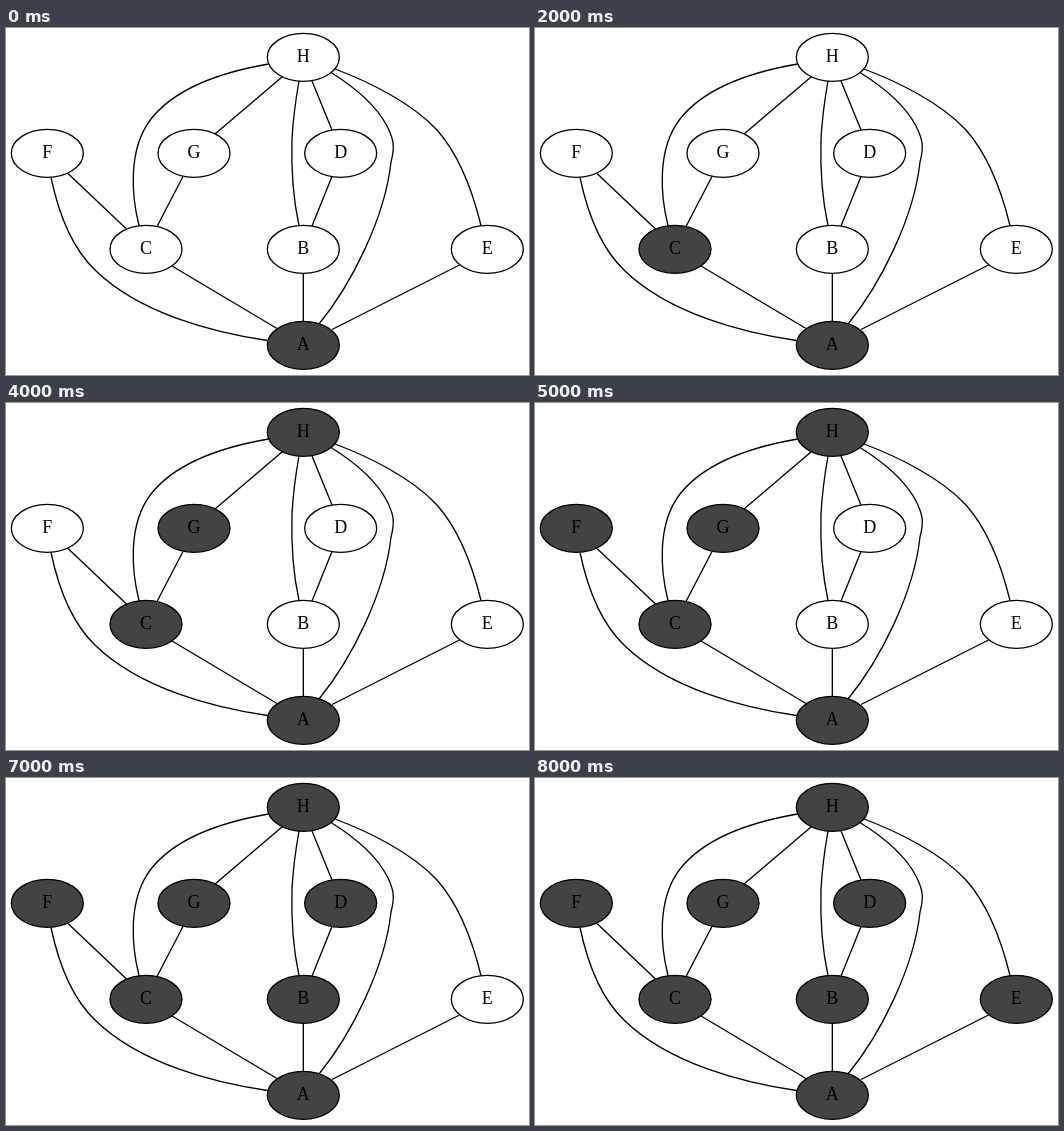
Recreate the animation shown at these times as an HTML page with a canvas. Size 523 by 347 pixels, loop 9 s.

```html
<!DOCTYPE html>
<html lang="en">
<head>
<meta charset="utf-8">
<title>Graph traversal</title>
<style>
  html, body { margin: 0; width: 100%; height: 100%; overflow: hidden; background: #fff; }
  canvas { display: block; width: 523px; height: 347px; }
</style>
</head>
<body>
<canvas id="stage"></canvas>
<script>
const W = 523, H = 347, LOOP = 9000;
const canvas = document.getElementById('stage');
const ctx = canvas.getContext('2d');
const dpr = window.devicePixelRatio || 1;
canvas.width = W * dpr;
canvas.height = H * dpr;
ctx.scale(dpr, dpr);

// label, centre, time of visit
const nodes = [
  ['A', 297.33, 317.33, 0],
  ['C', 140, 221.33, 2000],
  ['G', 188, 125.33, 3000],
  ['H', 297.33, 29.33, 4000],
  ['F', 41.33, 125.33, 5000],
  ['B', 297.33, 221.33, 6000],
  ['D', 334.67, 125.33, 7000],
  ['E', 481.33, 221.33, 8000]
];

const edges = new Path2D([
  'M276 49L209 106',
  'M306 53L326 102',
  'M62 145.5L120.5 201',
  'M177 148.5L151 198.5',
  'M326 148.5L306 198',
  'M166 238L271 300.5',
  'M297.33 245.3V293.3',
  'M453.5 237L326 301.5',
  'M262.5 36C222 43 171 58 145 91C121 122 126 170 133 197.5',
  'M293 53C290 70 287 92 286 111C285 143 287 170 293 197.5',
  'M325 44.5C345 57 369 75 381 98C388 112 389 119 385 134C379 190 345 257 313 296',
  'M329 41C361 53 405 74 431 102C455 129 468 169 475 197.5',
  'M45 149.5C51 178 63 217 89 242C134 286 209 305 261.5 312.5'
].join(''));

function drawNode(label, x, y, visited) {
  ctx.beginPath();
  ctx.ellipse(x, y, 36, 24, 0, 0, Math.PI * 2);
  ctx.fillStyle = visited ? '#444344' : '#fff';
  ctx.fill();
  ctx.stroke();
  ctx.fillStyle = '#000';
  ctx.fillText(label, x, Math.round(y + 4.9));
}

function draw(t) {
  ctx.fillStyle = '#fff';
  ctx.fillRect(0, 0, W, H);
  ctx.strokeStyle = '#000';
  ctx.lineWidth = 1.33;
  ctx.font = '18px "Liberation Serif", serif';
  ctx.textAlign = 'center';
  ctx.stroke(edges);
  for (const [label, x, y, at] of nodes) drawNode(label, x, y, t >= at);
}

const start = performance.now();
function tick() {
  draw((performance.now() - start) % LOOP);
  requestAnimationFrame(tick);
}
tick();
</script>
</body>
</html>
```
